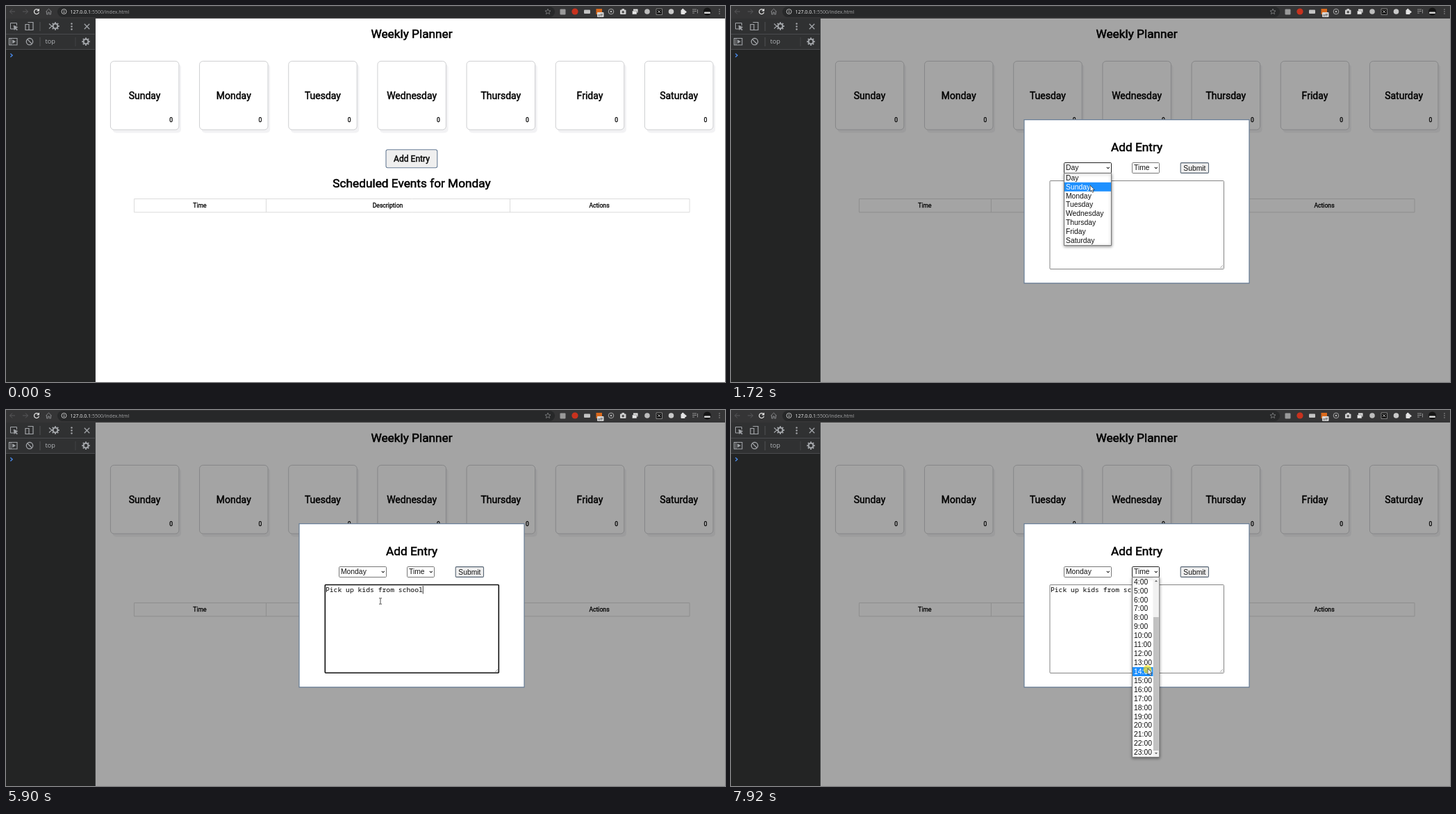
Recreate the animation shown at these times as an HTML page with a canvas. Size 1035x541 px, loop 8000 ms.

```html
<!DOCTYPE html>
<html lang="en">
<head>
<meta charset="utf-8">
<title>Weekly Planner</title>
<style>
html, body { margin: 0; width: 100%; height: 100%; overflow: hidden; background: #fff; }
canvas { display: block; }
</style>
</head>
<body>
<canvas id="stage" width="1035" height="541"></canvas>
<script>
const c = document.getElementById('stage').getContext('2d');
const LOOP = 8000, ROW = 12.92, LIST_TOP = 240.6;
const ROBOTO = 'Roboto, sans-serif', ARIAL = '"Liberation Sans", Arial, sans-serif';
const UI = '"Open Sans", sans-serif', MONO = '"Noto Sans Mono", monospace';
const SLATE = '#687d96', BLUE = '#1e90ff';
const days = ['Sunday', 'Monday', 'Tuesday', 'Wednesday', 'Thursday', 'Friday', 'Saturday'];
const hours = ['Time', ...Array.from({ length: 24 }, (_, h) => h + ':00')];
const note = 'Pick up kids from school';
const keyTimes = [3030, 3180, 3350, 3430, 3810, 3960, 4120, 4190, 4360, 4510, 4590, 4660,
  4660, 4740, 4970, 4970, 5120, 5200, 5280, 5360, 5440, 5670, 5750, 5900];
const clicks = [[690, 850], [1320, 1400], [2100, 2180], [2380, 2460], [6910, 7060], [7850, 8000]];
// Pointer path: time, x, y
const path = [[0, 752, 570], [70, 742, 545], [540, 608, 238], [690, 595, 222], [760, 595, 222],
  [850, 594, 222], [940, 594, 222], [1300, 542, 233], [1380, 542, 233], [1470, 528, 243],
  [1590, 528, 243], [1720, 517, 258], [1820, 517, 258], [1950, 510, 271], [2100, 510, 271],
  [2380, 536, 270], [2480, 539, 275], [6450, 539, 275], [6850, 613.5, 233], [6990, 613.5, 233],
  [7220, 606, 300], [7500, 600, 372], [8000, 600, 372]];

const within = (t, a, b) => t >= a && t < b;
const ramp = (t, a, b) => {
  const k = Math.min(1, Math.max(0, (t - a) / (b - a)));
  return k * k * (3 - 2 * k);
};

function pointerAt(t) {
  const i = path.findIndex((p, n) => n && t <= p[0]);
  const [a, x0, y0] = path[i - 1], [b, x1, y1] = path[i], k = ramp(t, a, b);
  return [x0 + (x1 - x0) * k, y0 + (y1 - y0) * k];
}

// y is the middle of the capitals
function text(s, x, y, size, font, color = '#000', align = 'left', bold = false) {
  c.font = size + 'px ' + font;
  c.textAlign = align;
  c.fillStyle = c.strokeStyle = color;
  c.fillText(s, x, y + size * .358);
  if (bold) {
    c.lineWidth = size * .033;
    c.strokeText(s, x, y + size * .358);
  }
}

function rect(x, y, w, h, fill, stroke, r = 0, lw = 1) {
  c.beginPath();
  c.roundRect(x, y, w, h, r);
  if (fill) { c.fillStyle = fill; c.fill(); }
  if (stroke) { c.strokeStyle = stroke; c.lineWidth = lw; c.stroke(); }
}

function line(d, color, lw = 1, x = 0, y = 0, fill) {
  c.save();
  c.translate(x, y);
  const p = new Path2D(d);
  if (fill) { c.fillStyle = fill; c.fill(p); }
  c.strokeStyle = color;
  c.lineWidth = lw;
  c.stroke(p);
  c.restore();
}

function circle(x, y, r, fill, stroke, lw = 1) {
  rect(x - r, y - r, 2 * r, 2 * r, fill, stroke, r, lw);
}

function gear(x, y, color) {
  circle(x, y, 3.4, null, color, 2);
  for (let i = 0; i < 8; i++) {
    const a = i * Math.PI / 4, u = Math.cos(a), v = Math.sin(a);
    line(`M${u * 4} ${v * 4}L${u * 5.8} ${v * 5.8}`, color, 2, x, y);
  }
}

function dots(x, y, gap, r, color) {
  for (const i of [-1, 0, 1]) circle(x, y + i * gap, r, color);
}

function browserBar() {
  rect(0, 0, 1035, 18, '#353536');
  rect(74, 1, 716, 15, '#272829', null, 7.5);
  const arrow = 'M4 0H-3.5M0 -3.5L-3.5 0L0 3.5';
  line(arrow, '#58595b', 1, 9, 8);
  line('M-4 0H3.5M0 -3.5L3.5 0L0 3.5', '#58595b', 1, 28, 8);
  line('M2.6 -2.2A3.5 3.5 0 1 0 3.4 1M3.4 -4V-1.2H.6', '#e8e8e8', 1.2, 44, 8);
  line('M-4.2 .3L0 -3.8L4.2 .3M-3 -.5V4H-1V1H1V4H3V-.5', '#8d8e90', .9, 61.5, 8);
  circle(83.5, 8, 3.5, null, '#d0d0d0', .9);
  line('M0 -2V-1M0 -.3V2', '#d0d0d0', 1, 83.5, 8);
  text('127.0.0.1', 92.5, 8.2, 7, UI, '#f2f2f2');
  text(':5500/index.html', 92.5 + c.measureText('127.0.0.1').width, 8.2, 7, UI, '#a6a7a9');
  line('M0 -4L1.1 -1.2L4 -1L1.8 .8L2.5 3.6L0 2L-2.5 3.6L-1.8 .8L-4 -1L-1.1 -1.2Z', '#8d8e90', .7, 780, 8);

  rect(797.5, 4.5, 8, 8, '#9a9a9a', null, 1);
  circle(819, 8, 4.6, '#c8321e');
  rect(832, 5.5, 9, 5.5, '#c4c4c4', null, 1);
  rect(849.5, 4, 8.5, 8, '#d9691c');
  rect(851, 9, 9.5, 7, '#d8d8d8', null, 1);
  text('off', 852, 12.6, 5.5, UI, '#222');
  circle(871, 8, 3.8, null, '#b4b4b4', .9);
  circle(871, 8, 1.3, '#b4b4b4');
  rect(884, 5.5, 8.5, 6.5, '#cfcfcf', null, 1);
  rect(886.5, 4, 3.5, 2, '#cfcfcf');
  circle(888.2, 8.7, 1.7, '#4a4a4a');
  rect(903, 4.5, 6.5, 5, '#e8e8e8');
  rect(901.5, 7, 6.5, 5, '#e8e8e8', '#555', 0, .6);
  circle(923, 8, 3.8, '#bdbdbd');
  rect(936, 4, 8.5, 8.5, '#111', '#aaa', 0, .7);
  line('M-2 -2L2 2M2 -2L-2 2', '#ddd', .8, 940.2, 8.2);
  circle(957.5, 8, 3.8, '#c9c9c9');
  rect(971.5, 5.5, 6, 6.5, '#e4e4e4', null, 1);
  circle(974.3, 5.2, 1.5, '#e4e4e4');
  circle(978, 8.6, 1.5, '#e4e4e4');
  line('M-4 -3H2M-4 -.5H2M-4 2H-1M3.5 -3V2.5', '#8f8f8f', 1, 992, 8);
  circle(1009.5, 8, 5.5, '#151515');
  rect(1005, 8.5, 9, 2.5, '#d5d5d5', null, 1);
  dots(1027, 8, 3, .8, '#9a9a9a');
}

function devtools() {
  const g = '#a2a5a9';
  rect(0, 18, 129, 523, '#232424');
  rect(0, 18, 129, 44, '#303132');
  rect(0, 40, 129, 1, '#4a4b4d');
  rect(0, 62, 129, 1, '#4a4b4d');
  rect(128, 18, 1, 523, '#3c3d3f');
  line('M3 4H-4.5V-4.5H4.5V-1', g, 1, 11, 29);
  line('M0 -1L6 1.5L3.4 2.7L5.6 5.2L4.6 6L2.4 3.4L1 5.6Z', g, .5, 11, 29, g);
  line('M-2 -5.5H5.5V5.5H0M-5.5 -2.5H-.5V5.5H-5.5Z', g, 1.2, 33.5, 29);
  rect(48.5, 23, 1, 13, '#505254');
  line('M-3 -3.5L1 0L-3 3.5', g, 1.2, 65, 29);
  gear(71, 29, g);
  dots(94.5, 29.5, 4, 1.2, g);
  line('M-3.7 -3.7L3.7 3.7M3.7 -3.7L-3.7 3.7', g, 1.3, 116.5, 29.5);
  rect(4.5, 46.5, 11.5, 9.5, null, g, 0, 1.1);
  line('M-3 -5V5', g, 1, 10, 51.2);
  line('M-1 -2.5L3 0L-1 2.5Z', g, .6, 10.5, 51.2, g);
  circle(34, 51.2, 4.7, null, g, 1.3);
  line('M-3.3 -3.3L3.3 3.3', g, 1.3, 34, 51.2);
  rect(48.5, 45, 1, 13, '#505254');
  text('top', 56.5, 50.8, 9.2, UI, '#b0b3b7');
  rect(99.5, 45, 1, 13, '#404244');
  gear(115, 51.2, g);
  line('M-1.6 -2.5L1.2 0L-1.6 2.5', '#4a8df0', 1.3, 8, 71);
}

function planner(t) {
  rect(129, 18, 906, 523, '#fff');
  text('Weekly Planner', 584, 40.2, 17.25, ROBOTO, '#000', 'center', true);
  days.forEach((day, i) => {
    const x = 150 + i * 128.17;
    rect(x + 3.5, 83.5, 98.5, 99, '#f2f2f4', null, 5);
    rect(x + .4, 79.4, 98.5, 98.6, '#fff', '#c9cacc', 5, .9);
    text(day, x + 49.6, 128.7, 14, ROBOTO, '#000', 'center', true);
    text('0', x + 90.2, 164, 8.6, ROBOTO, '#000', 'right', true);
  });
  const mix = (a, b) => Math.round(a + (b - a) * ramp(t, 470, 690));
  const ink = mix(0, 84);
  rect(547, 206.7, 73.8, 26, `rgb(${mix(239, 190)},${mix(239, 195)},${mix(239, 202)})`, SLATE, 2.5, 1.1);
  text('Add Entry', 584, 219.3, 12.1, ROBOTO, `rgb(${ink},${ink},${ink})`, 'center', true);
  text('Scheduled Events for Monday', 584, 255, 17.25, ROBOTO, '#000', 'center', true);
  rect(184.5, 277.5, 799.5, 19.3, null, '#dcdcdc');
  line('M374.5 277V297M725.5 277V297', '#dcdcdc');
  [['Time', 279], ['Description', 549.5], ['Actions', 854]].forEach(([s, x]) =>
    text(s, x, 287, 8.62, ROBOTO, '#000', 'center', true));
}

function select(x, w, label, open) {
  rect(x + .5, 225.5, w - 1, 15, '#fff', open ? '#222' : '#777', 1.2);
  text(label, x + 3, 232.6, 10.35, ARIAL, '#111');
  line('M-2 -1L0 1L2 -1', '#222', 1.1, x + w - 5.2, 232.8);
}

function list(x, w, items, visible, hover, scroll, rowWidth) {
  const h = visible * ROW + .6;
  c.save();
  c.shadowColor = 'rgba(0,0,0,.4)';
  c.shadowBlur = 4;
  c.shadowOffsetY = 1;
  rect(x + .5, LIST_TOP, w - 1, h, '#fff', '#777');
  c.restore();
  c.save();
  c.beginPath();
  c.rect(x + .5, LIST_TOP + .2, w - 1, h - .4);
  c.clip();
  items.forEach((s, i) => {
    const y = LIST_TOP + .3 + (i - scroll) * ROW;
    if (i === hover) rect(x + 1, y, rowWidth, ROW, BLUE);
    text(s, x + 3, y + 6.1, 10.35, ARIAL, i === hover ? '#fff' : '#111');
  });
  c.restore();
}

function modal(t, px, py) {
  const typed = keyTimes.filter(k => t >= k).length;
  const dayOpen = within(t, 1360, 2140), timeOpen = t >= 6910;
  const focused = within(t, 2400, 6910);
  rect(129, 18, 906, 523, 'rgba(0,0,0,.355)');
  rect(422, 163.6, 324, 235.2, '#fff', SLATE, 0, 1.2);
  text('Add Entry', 584, 203, 17.25, ROBOTO, '#000', 'center', true);
  select(479, 69, t < 2140 ? 'Day' : 'Monday', dayOpen);
  select(577, 40, 'Time', timeOpen);
  rect(647.2, 225.6, 40.3, 14.8, '#efefef', '#566473', 1.5, 1.1);
  text('Submit', 667.4, 232.8, 10.35, ARIAL, '#111', 'center');

  if (focused) rect(459.3, 251.5, 250, 126.8, '#fff', '#101010', 1, 1.6);
  else rect(459, 251.5, 250.5, 127, '#fff', '#767676', 1, .9);
  line('M-4 0L0 -4M-1.6 0L0 -1.6', '#777', .6, 708, 377);
  [...note.slice(0, typed)].forEach((ch, i) => text(ch, 459.9 + i * 5.83, 259, 9.7, MONO));
  const lastKey = typed ? keyTimes[typed - 1] : 2400;
  if (focused && (t - lastKey) % 1000 < (typed ? 550 : 480))
    rect(459.9 + typed * 5.83, 253, .8, 11.5, '#000');

  const rowAt = Math.floor((py - LIST_TOP) / ROW);
  if (dayOpen) list(479, 69, ['Day', ...days], 8, Math.max(0, rowAt), 0, 67);
  if (timeOpen) {
    const scroll = 5 * ramp(t, 7520, 7820);
    const hover = rowAt < 0 ? 0 : Math.floor((py - LIST_TOP) / ROW + scroll);
    list(577, 40, hours, 20, hover, scroll, 30);
    rect(607.5, 241, 8.7, 258, '#f1f1f1');
    rect(608, 250.5 + scroll * 9.5, 7.7, 192, '#c1c1c1');
    line('M-1.6 .8L0 -.9L1.6 .8Z', '#555', .4, 612, 246, '#555');
    line('M-1.6 -.8L0 .9L1.6 -.8Z', '#555', .4, 612, 494, '#555');
  }
}

function pointer(t, x, y) {
  if (clicks.some(([a, b]) => within(t, a, b))) circle(x - .5, y + 1, 6, 'rgba(255,225,0,.62)');
  if (within(t, 540, 850))
    line('M-1 1Q0 -.5 1 1V4.6Q2.6 4 3 5.2Q5 5 5.2 6.8V9.5L4.2 12.5H-1.4L-4 8.2Q-3.6 6.6 -1 8.4Z', '#111', .8, x, y, '#fff');
  else if (within(t, 2330, 6520))
    line('M-2 -4.2H-.6L0 -3.8L.6 -4.2H2M0 -3.8V3.8M-2 4.2H-.6L0 3.8L.6 4.2H2', '#222', .8, x, y);
  else
    line('M0 0V9L2 7.2L3.4 10.3L4.9 9.6L3.6 6.6H6.3Z', '#222', .7, x, y, '#fff');
}

function draw(t) {
  const [x, y] = pointerAt(t);
  planner(t);
  if (t >= 850) modal(t, x, y);
  pointer(t, x, y);
  devtools();
  browserBar();
}

const start = performance.now();
function tick() {
  draw((performance.now() - start) % LOOP);
  requestAnimationFrame(tick);
}
tick();
</script>
</body>
</html>
```
